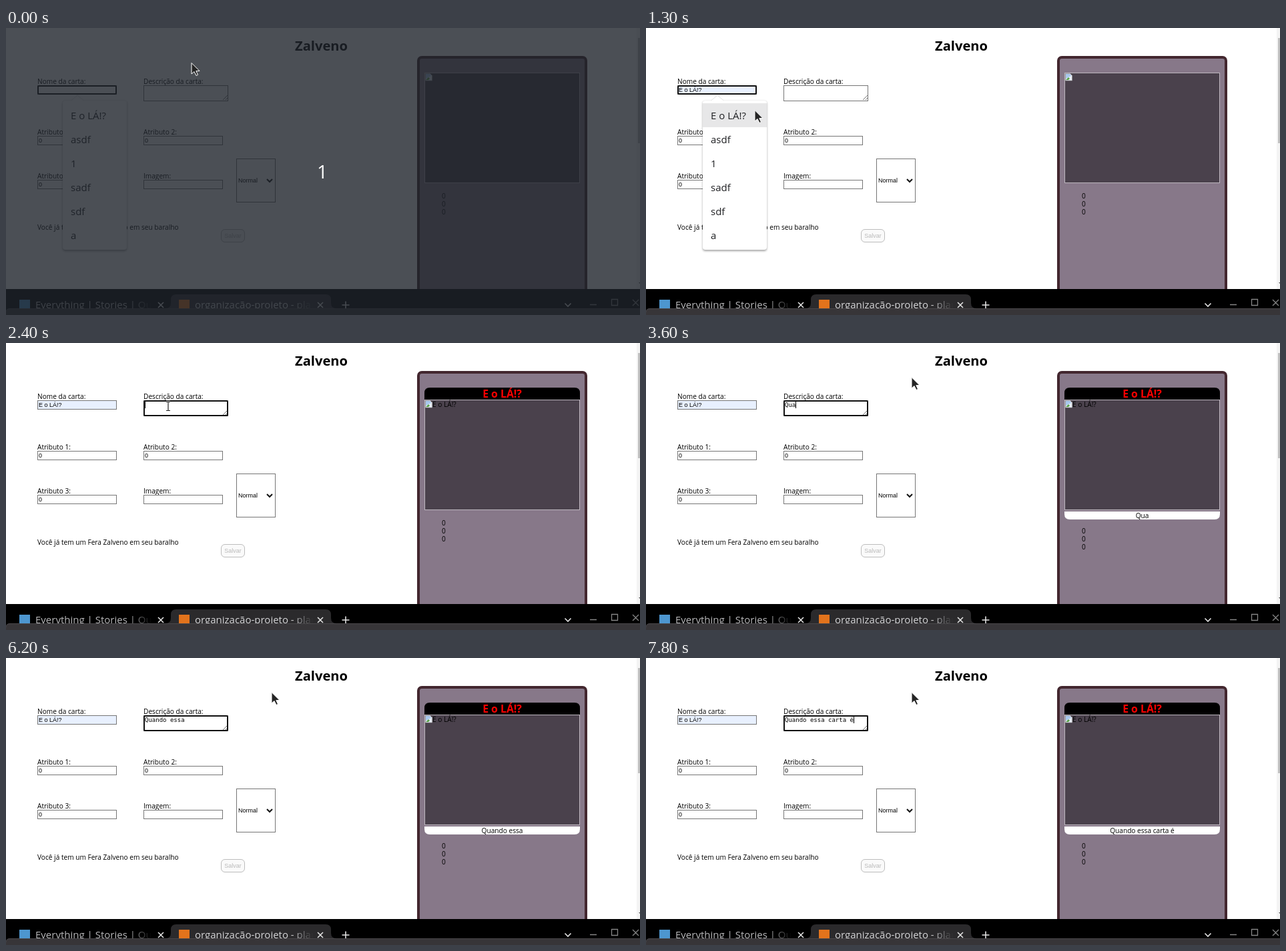
Write an HTML page that moves like this. It is 950 px wide and 431 px high and loops after 8000 ms.

```html
<!DOCTYPE html>
<html lang="pt">
<head>
<meta charset="utf-8">
<title>Editor de cartas</title>
<style>
  html, body { margin: 0; width: 100%; height: 100%; overflow: hidden; background: #fff; }
  svg { display: block; width: 100%; height: 100%; }
  text { font: 10.15px "Open Sans", "Noto Sans", sans-serif; white-space: pre; }
  .h1 { font-size: 20.1px; font-weight: 700; }
  .ui { font-size: 15px; }
  .in { font: 9px "Liberation Sans", Arial, sans-serif; }
  .mono { font: 9px "DejaVu Sans Mono", monospace; }
  .mid { text-anchor: middle; }
  .box { fill: #fff; stroke: #767676; }
  .focus { fill: none; stroke: #101010; stroke-width: 2; }
  .line { fill: none; stroke: #e3e3e3; stroke-width: 1.6; }
</style>
</head>
<body>
<svg viewBox="0 0 950 431">
  <defs>
    <linearGradient id="fadeA"><stop stop-color="#000" stop-opacity="0"/><stop offset="1" stop-color="#000"/></linearGradient>
    <linearGradient id="fadeB"><stop stop-color="#2b2a2c" stop-opacity="0"/><stop offset="1" stop-color="#2b2a2c"/></linearGradient>
    <filter id="soft" x="-20%" y="-20%" width="140%" height="140%"><feGaussianBlur stdDeviation="1.5"/></filter>
  </defs>

  <rect width="950" height="431" fill="#fff"/>
  <text class="h1 mid" x="472.5" y="34">Zalveno</text>
  <g id="form"></g>
  <rect id="nameFill" x="48" y="87" width="117" height="12" fill="#e8f0fe"/>
  <text id="name" class="in" x="49" y="96">E o LÁ!?</text>
  <rect id="nameFocus" class="focus" x="48" y="87" width="117" height="12" rx="1.5"/>
  <rect id="nameCaret" x="49" y="88" width="1" height="10"/>

  <path d="M325 108l7-7M329 108l3-3" stroke="#777" fill="none"/>
  <rect id="descFocus" class="focus" x="207" y="87" width="125" height="22" rx="1.5"/>
  <text id="desc" class="mono" x="208" y="96"></text>
  <rect id="descCaret" y="88" width="1" height="10"/>

  <rect class="box" x="345.5" y="196.5" width="58" height="65"/>
  <text class="in" x="348" y="232">Normal</text>
  <path d="M391 227l4 4 4-4" fill="none" stroke="#111" stroke-width="2"/>
  <text x="47" y="303">Você já tem um Fera Zalveno em seu baralho</text>
  <rect x="322.5" y="302.5" width="35" height="19" rx="5.5" fill="#fafafa" stroke="#bdbdbd"/>
  <text class="in mid" x="340" y="315" fill="#b9b9b9">Salvar</text>

  <rect x="618" y="44" width="251" height="380" rx="5" fill="#877889" stroke="#43272f" stroke-width="4"/>
  <g id="cardName">
    <path d="M627 85V75q0-8 8-8H852q8 0 8 8V85z"/>
    <text class="mid" x="743.5" y="82" fill="#f00" style="font-size:15.8px;font-weight:700">E o LÁ!?</text>
  </g>
  <g id="cardImg">
    <rect x="627.5" y="67.5" width="232" height="165" fill="#4a414c" stroke="#bdb6be"/>
    <path d="M628.5 68.5h7l3 3v7.500h-10z" fill="#e9eef5" stroke="#9a9a9a" stroke-width=".7"/>
    <path d="M629 69h6l2 3-8 4z" fill="#a9c8ee"/>
    <path d="M629 78l4-4 2 2-2 2z" fill="#58a24a"/>
    <text id="alt" x="639" y="78">E o LÁ!?</text>
  </g>
  <g id="cardDesc">
    <path d="M627 253H860V257q0 8-8 8H635q-8 0-8-8z" fill="#fff"/>
    <text id="cardText" class="mid" x="743.5" y="263"></text>
  </g>
  <g id="stats" class="mid">
    <text x="656" y="256">0</text><text x="656" y="268">0</text><text x="656" y="280">0</text>
  </g>

  <rect x="945" width="5" height="392" fill="#f4f4f4"/>
  <rect x="947" y="15" width="3" height="158" fill="#c1c1c1"/>
  <path d="M948 382h2v2z" fill="#555"/>

  <g id="menu">
    <rect x="85" y="110" width="96" height="225" rx="4" opacity=".35" filter="url(#soft)"/>
    <path d="M97 109.500l10-8.500 10 8.500" fill="#fff" stroke="#e2e2e2"/>
    <rect x="85" y="109" width="96" height="224" rx="4" fill="#fff"/>
    <rect id="hover" x="85" y="113" width="96" height="36" fill="#e7e7e8"/>
  </g>

  <rect y="392" width="950" height="39"/>
  <path d="M239 421q8 0 8-8v-5q0-8 8-8H479q8 0 8 8v5q0 8 8 8z" fill="#2b2a2c"/>
  <rect x="20" y="408" width="16" height="14" fill="#4d96cf"/>
  <rect x="259" y="408" width="16" height="14" fill="#e2731c"/>
  <text class="ui" x="44" y="421" fill="#b9b9bb">Everything | Stories | Quil</text>
  <text class="ui" x="283" y="421" fill="#d6d6d8">organização-projeto - plan</text>
  <rect x="184" y="402" width="34" height="19" fill="url(#fadeA)"/>
  <rect x="218" y="402" width="9" height="19"/>
  <rect x="426" y="402" width="34" height="19" fill="url(#fadeB)"/>
  <rect x="460" y="402" width="6" height="19" fill="#2b2a2c"/>
  <g class="line">
    <path d="M228 412l8 8m0-8l-8 8M467 412l8 8m0-8l-8 8"/>
    <path d="M503.500 416h11M509 410.500v11"/>
    <path d="M837.500 413.500l4.500 4.500 4.500-4.500"/>
    <path d="M875 415.500h10M907.500 407.500h9v9h-9zM939 408l9 9m0-9l-9 9" stroke="#858585" stroke-width="1.300"/>
  </g>
  <path d="M0 431v-4q0-6 6-6H950v10z" fill="#373538"/>
  <path d="M0 427q0-5.500 6-5.500H950" fill="none" stroke="#4a484b"/>

  <g id="count">
    <rect width="950" height="431" fill="#1f232b" opacity=".8"/>
    <text class="mid" x="474" y="226" fill="#fff" style="font-size:28px">1</text>
  </g>
  <path id="arrow" d="M0 .5V17l4-3.500 3 6 2.500-1.200L6.800 12.500H12z" fill="#252525" stroke="#fff"/>
  <g id="beam" fill="none">
    <path d="M-3-6.500h2.500l.5.500.5-.5h2.500M0-6V6M-3 6.500h2.500l.5-.5.5.5h2.500" stroke="#fff" stroke-width="2.600"/>
    <path d="M-3-6.500h2.500l.5.500.5-.5h2.500M0-6V6M-3 6.500h2.500l.5-.5.5.5h2.500" stroke="#222" stroke-width="1.200"/>
  </g>
</svg>
<script>
const LOOP = 8000, CHAR = 5.42, PHRASE = 'Quando essa carta é';
const el = {};
document.querySelectorAll('[id]').forEach(n => el[n.id] = n);

function add(parent, tag, attrs, content = '') {
  const n = document.createElementNS('http://www.w3.org/2000/svg', tag);
  for (const k in attrs) n.setAttribute(k, attrs[k]);
  n.textContent = content;
  parent.append(n);
}

// label, x, y of the field, width, height, value
[
  ['Nome da carta:', 47, 86, 119, 14, ''],
  ['Descrição da carta:', 206, 86, 127, 24, ''],
  ['Atributo 1:', 47, 162, 119, 14, '0'],
  ['Atributo 2:', 206, 162, 119, 14, '0'],
  ['Atributo 3:', 47, 228, 119, 14, '0'],
  ['Imagem:', 206, 228, 119, 14, '']
].forEach(([label, x, y, width, height, value]) => {
  add(el.form, 'text', { x, y: y - 2 }, label);
  add(el.form, 'rect', { class: 'box', x: x + .5, y: y + .5, width: width - 1, height: height - 1 });
  add(el.form, 'text', { class: 'in', x: x + 2, y: y + 10 }, value);
});
['E o LÁ!?', 'asdf', '1', 'sadf', 'sdf', 'a'].forEach((s, i) =>
  add(el.menu, 'text', { class: 'ui', x: 97, y: 137 + 36 * i, fill: '#202124' }, s));

// time, x, y, text beam
const pointer = [
  [0, 278, 52], [600, 270, 56], [700, 262, 62], [900, 243, 76], [1000, 219, 95],
  [1100, 192, 112], [1200, 170, 122], [1300, 163, 123], [1900, 168, 122],
  [2100, 190, 115], [2200, 222, 104, 1], [2300, 240, 97, 1], [2400, 243, 95, 1],
  [2600, 268, 104, 1], [2700, 345, 64], [2900, 398, 51]
];
// time, characters typed
const typing = [
  [0, 0], [3100, 1], [3500, 2], [3600, 3], [4000, 4], [4100, 5], [4400, 6], [5000, 8],
  [5200, 9], [5400, 10], [5500, 11], [5600, 12], [6600, 13], [6700, 14], [6900, 15],
  [7100, 16], [7200, 17], [7300, 18], [7800, 19]
];
const fade = [[0, 1], [1700, .5], [1800, .2], [1900, 0]];

const at = (table, t) => table.findLast(row => row[0] <= t);
const show = (id, on) => el[id].style.display = on ? '' : 'none';
const move = (id, x, y) => el[id].setAttribute('transform', `translate(${x} ${y})`);

function draw(t) {
  const [, x, y, beam] = at(pointer, t);
  const typed = at(typing, t)[1];
  const hover = t >= 1200, picked = t >= 1700, editing = t >= 2300;
  const text = PHRASE.slice(0, typed);

  show('count', t < 300);
  show('arrow', !beam);
  show('beam', beam);
  move('arrow', x, y);
  move('beam', x, y);

  show('hover', hover);
  el.menu.setAttribute('opacity', at(fade, t)[1]);
  show('name', hover);
  show('nameFill', hover);
  show('nameFocus', !editing);
  show('nameCaret', t >= 700 && t < 1200);

  show('cardName', picked);
  show('alt', picked);
  move('cardImg', 0, picked ? 18 : 0);
  show('cardDesc', typed);
  move('stats', 0, (picked ? 18 : 0) + (typed ? 12 : 0));
  el.cardText.textContent = text.trim();

  show('descFocus', editing);
  el.desc.textContent = text;
  el.descCaret.setAttribute('x', Math.round(208 + typed * CHAR - .4));
  show('descCaret', editing && !(t >= 6200 && t < 6600));
}

function tick() {
  draw(performance.now() % LOOP);
  requestAnimationFrame(tick);
}
tick();
</script>
</body>
</html>
```
